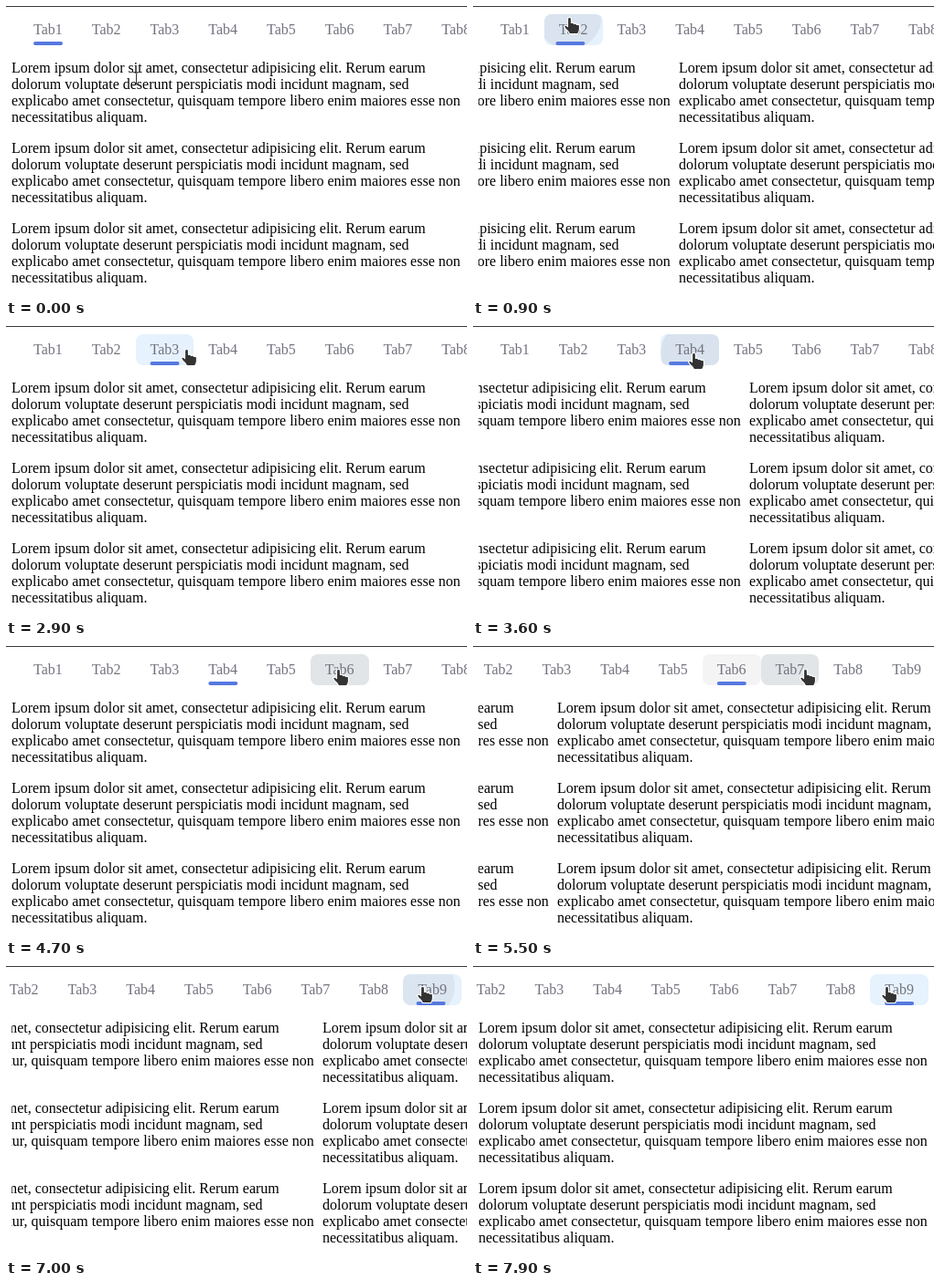
These frames come from a looping animation (504 by 320 pixels, 8 s). An HTML page:

```html
<!DOCTYPE html>
<html lang="en">
<head>
<meta charset="utf-8">
<title>Sliding tabs</title>
<style>
  html, body { margin: 0; width: 100%; height: 100%; overflow: hidden; background: #fff; }
  body { position: relative; font: 16px/18px "Liberation Serif", "Times New Roman", serif; color: #000; }
  #stage { position: absolute; left: 0; top: 0; width: 504px; height: 320px; overflow: hidden; }
  #edge { position: absolute; left: 0; top: 0; width: 100%; height: 1px; background: #3a3a3a; }
  #header { position: absolute; left: 4px; top: 9px; width: 500px; height: 34px; overflow: hidden; }
  #strip { position: absolute; left: 10px; top: 0; display: flex; }
  .tab { flex: none; padding: 8px 16px; border-radius: 8px; color: #73737f; white-space: nowrap; }
  #bar { position: absolute; left: 0; top: 30px; height: 4px; border-radius: 2px; background: #5679e0; }
  #view { position: absolute; left: 6px; top: 59px; width: 500px; height: 252px; overflow: hidden; }
  .panel { position: absolute; left: 0; top: 0; width: 500px; white-space: nowrap; }
  p { margin: 0 0 16px; }
  svg { position: absolute; left: 0; top: 0; overflow: visible; }
</style>
</head>
<body>
<div id="stage">
  <div id="edge"></div>
  <div id="header"><div id="strip"><div id="bar"></div></div></div>
  <div id="view"></div>
  <svg width="1" height="1">
    <g id="beam" fill="none">
      <path id="beamLine" d="M-4-7Q0-7 0-5Q0-7 4-7M0-5V6M-4 7.5Q0 7.5 0 5.5Q0 7.5 4 7.5" stroke="#333"/>
    </g>
    <path id="hand" fill="#333" stroke="#fff" stroke-width="1.2" stroke-linejoin="round"
      d="M-2 2Q-2 0 0 0Q2 0 2 2V6Q4 5 5 7Q7 6 8 8Q11 7 11 10V13Q11 15 9 18H0Q-1 15-4 13L-6 10Q-5 8-3 9L-2 10Z"/>
  </svg>
</div>
<script>
const LOOP = 8000, STEP = 100, PANEL = 500, MAX_SCROLL = 90;
const LINES = [
  "Lorem ipsum dolor sit amet, consectetur adipisicing elit. Rerum earum",
  "dolorum voluptate deserunt perspiciatis modi incidunt magnam, sed",
  "explicabo amet consectetur, quisquam tempore libero enim maiores esse non",
  "necessitatibus aliquam."
];
// tab index, time, ripple centre inside the tab
const CLICKS = [
  { tab: 1, at: 600, x: 27, y: 3 },
  { tab: 2, at: 2164, x: 56, y: 16 },
  { tab: 3, at: 3347, x: 36, y: 20 },
  { tab: 5, at: 5065, x: 30, y: 16, scroll: true },
  { tab: 8, at: 6630, x: 21, y: 13 }
];
// tab index, pointer enters, pointer leaves
const HOVERS = [
  [1, 280, 1590], [2, 1590, 2973], [3, 2973, 4176], [4, 4176, 4465],
  [5, 4465, 5315], [6, 5315, 5852], [7, 5852, 6170], [8, 6170, LOOP]
];
// time, x, y
const POINTER = [
  [0, 142, 79], [50, 142, 79], [500, 105, 12], [1480, 105, 12], [1800, 197, 25],
  [2900, 197, 25], [3300, 241, 29], [4050, 241, 29], [4600, 363, 25],
  [5800, 363, 25], [6400, 455, 22], [7890, 455, 22], [7900, 452, 22], [LOOP, 452, 22]
];
const GREY = [225, 229, 231], BLUE = [230, 242, 253];

const $ = id => document.getElementById(id);
const clamp = v => Math.max(0, Math.min(1, v));
const mix = (a, b, k) => a + (b - a) * k;

function bezier(x1, y1, x2, y2) {
  const at = (a, b, s) => 3 * a * s * (1 - s) ** 2 + 3 * b * s * s * (1 - s) + s ** 3;
  return t => {
    let lo = 0, hi = 1;
    for (let i = 0; i < 24; i++) {
      const s = (lo + hi) / 2;
      if (at(x1, x2, s) < t) lo = s; else hi = s;
    }
    return t <= 0 ? 0 : t >= 1 ? 1 : at(y1, y2, lo);
  };
}
const ease = bezier(0.25, 0.1, 0.25, 1);
const easeInOut = bezier(0.42, 0, 0.58, 1);

function add(parent, cls, html) {
  const el = document.createElement("div");
  el.className = cls;
  el.innerHTML = html;
  parent.append(el);
  return el;
}
const text = `<p>${LINES.join("<br>")}</p>`.repeat(3);
const tabs = Array.from({ length: 9 }, (_, i) => add($("strip"), "tab", "Tab" + (i + 1)));
const panels = tabs.map(() => add($("view"), "panel", text));
const pitch = tabs[0].getBoundingClientRect().width;
$("bar").style.width = pitch - 32 + "px";

function pointerAt(t) {
  const i = Math.max(1, POINTER.findIndex(p => p[0] > t));
  const a = POINTER[i - 1], b = POINTER[i];
  const k = (t - a[0]) / (b[0] - a[0]);
  return [mix(a[1], b[1], k), mix(a[2], b[2], k)];
}

function paintTab(tab, i, t) {
  let shown = 0;
  for (const [n, enter, leave] of HOVERS)
    if (n === i) shown = Math.max(shown, Math.min(clamp((t - enter) / 180), clamp(1 - (t - leave) / 180)));
  const click = CLICKS.find(c => c.tab === i);
  const age = click ? t - click.at : -1;
  const rgb = GREY.map((g, k) => Math.round(mix(g, BLUE[k], clamp(age / 200))));
  tab.style.backgroundColor = `rgba(${rgb},${shown})`;
  if (age >= 0 && age < 750) {
    const r = 35 * ease(age / 220);
    const ink = `rgba(60,40,60,${0.12 * (1 - age / 750)})`;
    tab.style.backgroundImage =
      `radial-gradient(circle at ${click.x}px ${click.y}px, ${ink} ${r}px, transparent ${r + 1}px)`;
  } else tab.style.backgroundImage = "none";
}

function draw(t) {
  let bar = 0, slide = 0, scroll = 0;
  for (const c of CLICKS) {
    const moved = easeInOut((t - c.at - 20) / 522);
    bar = mix(bar, c.tab, ease((t - c.at) / 420));
    slide = mix(slide, c.tab, moved);
    if (c.scroll) scroll = MAX_SCROLL * moved;
  }
  $("strip").style.transform = `translateX(${-Math.round(scroll)}px)`;
  $("bar").style.transform = `translateX(${16 + bar * pitch}px)`;
  panels.forEach((p, i) => {
    const x = Math.round((i - slide) * PANEL);
    p.style.transform = `translateX(${x}px)`;
    p.style.visibility = Math.abs(x) < PANEL ? "visible" : "hidden";
  });
  tabs.forEach((tab, i) => paintTab(tab, i, t));

  const [x, y] = pointerAt(t);
  const place = `translate(${Math.round(x) + 0.5} ${Math.round(y) + 0.5})`;
  for (const [id, on] of [["hand", y < 43], ["beam", y >= 43]]) {
    $(id).setAttribute("transform", place);
    $(id).style.display = on ? "" : "none";
  }
}

// The picture advances ten times a second.
const start = performance.now();
function tick() {
  const t = (performance.now() - start) % LOOP;
  draw(Math.floor(t / STEP) * STEP);
  requestAnimationFrame(tick);
}
tick();
</script>
</body>
</html>
```
